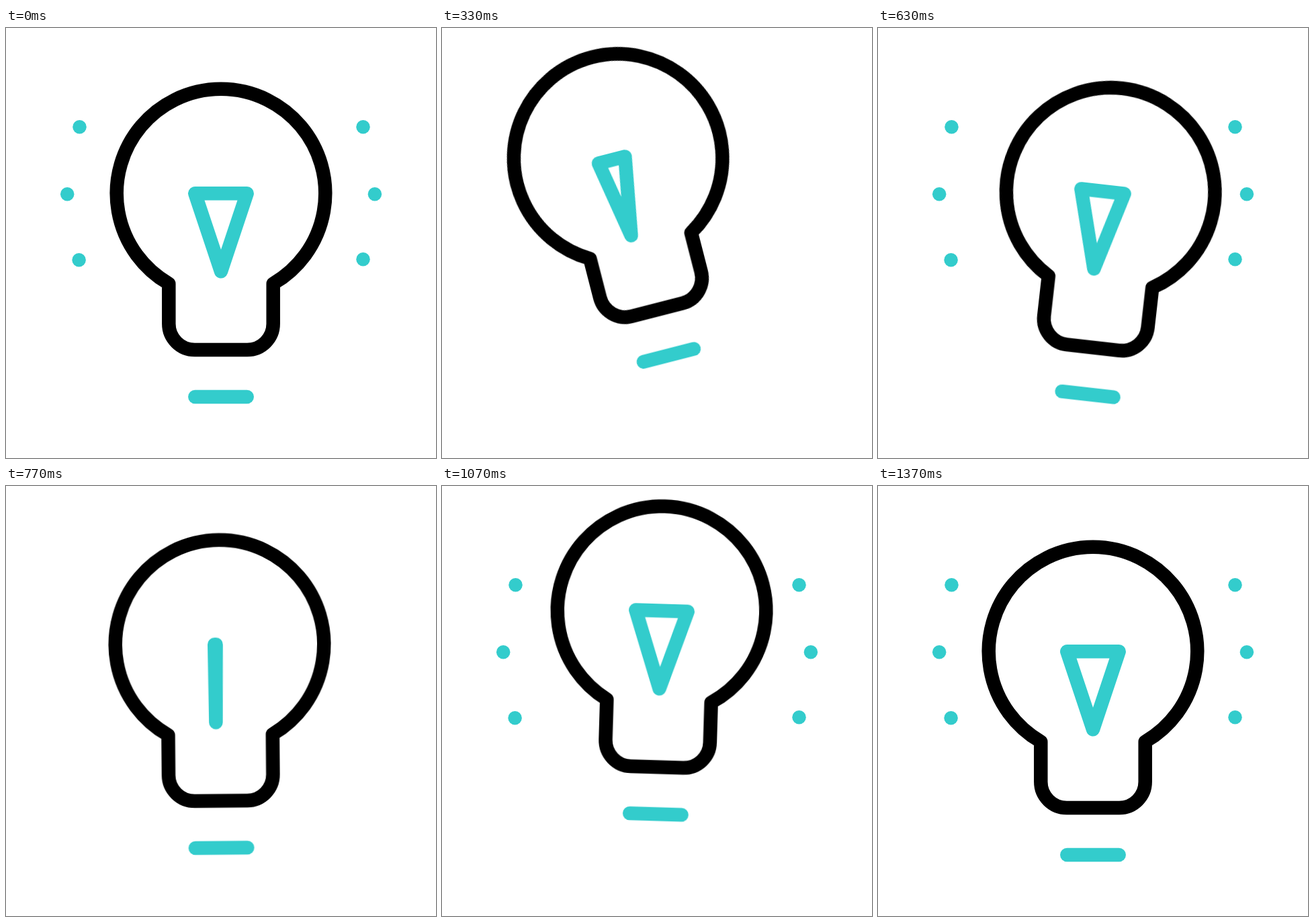
Recreate the animation shown at these times as an HTML page without scripts. Size 640 by 640 pixels, loop 1.67 s.

```html
<!DOCTYPE html>
<html lang="en">
<head>
<meta charset="utf-8">
<title>Hopping light bulb</title>
<style>
  :root { --teal: #33cccc; }

  html, body {
    margin: 0;
    height: 100%;
    overflow: hidden;
    background: #fff;
  }

  svg {
    display: block;
    width: 100%;
    height: 100%;
  }

  .bulb, .filament, .dots {
    animation: 1670ms cubic-bezier(.333, 0, .667, 1) infinite;
  }

  .bulb {
    fill: none;
    stroke: var(--teal);
    stroke-width: 20.5;
    stroke-linecap: round;
    stroke-linejoin: round;
    transform-origin: 320px 479px;
    animation-name: hop, tilt;
  }

  .glass { stroke: #000; }

  .filament {
    animation-name: spin;
    animation-timing-function: cubic-bezier(.5, 0, .5, 1);
  }

  .dots {
    fill: var(--teal);
    animation-name: blink;
    animation-timing-function: step-end;
  }

  @keyframes hop {
    0% { translate: 0 0; animation-timing-function: cubic-bezier(.333, .06, .667, .98); }
    24%, 60.8% { translate: 0 -65px; }
    40%, 41.2%, 82%, 100% { translate: 0 0; }
  }

  @keyframes tilt {
    0% { rotate: 0deg; animation-timing-function: cubic-bezier(.333, .06, .667, .98); }
    24% { rotate: -15.7deg; }
    35.5% { rotate: 7deg; }
    52% { rotate: -3.5deg; }
    66% { rotate: 2deg; }
    82%, 100% { rotate: 0deg; }
  }

  /* Half turns around an axis slightly left of centre */
  @keyframes spin {
    0%, 62%, 100% { d: path("M281.3 246.3 L358.7 246.3 L320 362.3 Z"); }
    30.8% { d: path("M345.9 246.3 L268.5 246.3 L307.2 362.3 Z"); }
  }

  @keyframes blink {
    0%, 27.4%, 54.8%, 81.9%, 100% { opacity: 1; }
    13.7%, 41.1%, 68.1% { opacity: 0; }
  }
</style>
</head>
<body>
<svg viewBox="0 0 640 640">
  <g class="dots">
    <circle cx="109.5" cy="147.3" r="10.25"/>
    <circle cx="91.2" cy="247.2" r="10.25"/>
    <circle cx="108.6" cy="345.2" r="10.25"/>
    <circle cx="531.5" cy="147.3" r="10.25"/>
    <circle cx="548.9" cy="247.2" r="10.25"/>
    <circle cx="531.5" cy="344.2" r="10.25"/>
  </g>
  <g class="bulb">
    <path class="glass" d="M242.3 380.5 A155.25 155.25 0 1 1 397.7 380.5 V440.3 a38.7 38.7 0 0 1 -38.7 38.7 H281 a38.7 38.7 0 0 1 -38.7 -38.7 Z"/>
    <path class="filament" d="M281.3 246.3 L358.7 246.3 L320 362.3 Z"/>
    <path d="M281.3 549 H358.7"/>
  </g>
</svg>
</body>
</html>
```
